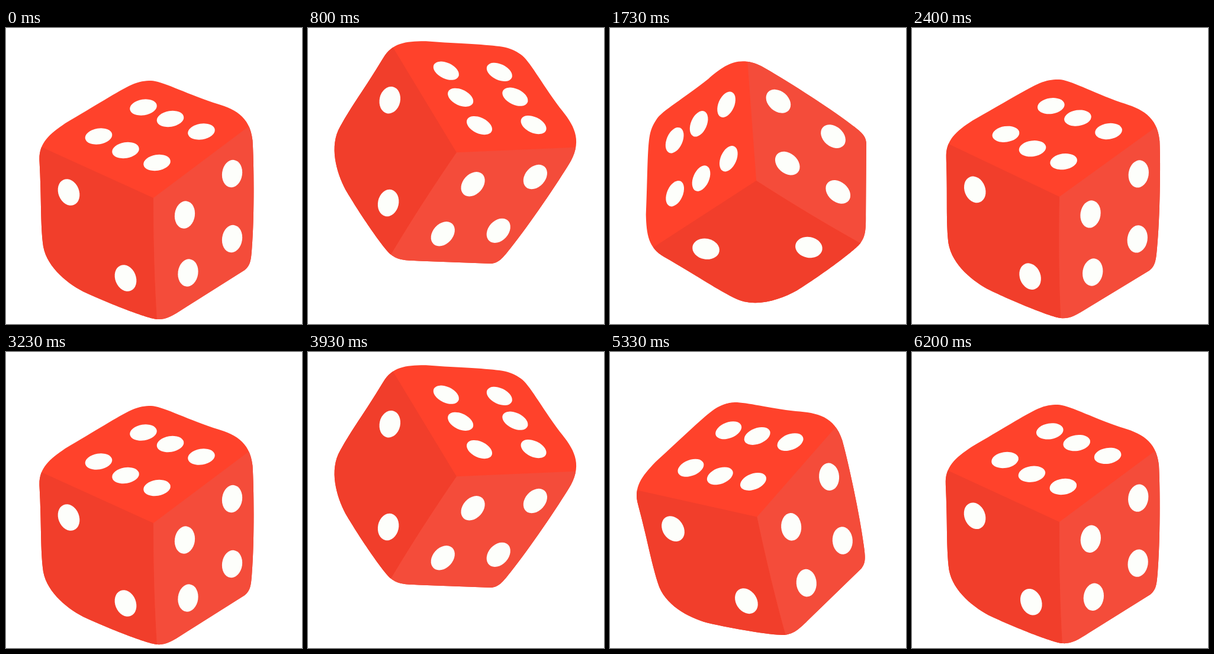
An HTML page that plays this animation: 500x500 px, repeating every 6230 ms.

```html
<!DOCTYPE html>
<html>
<head>
<meta charset="utf-8">
<title>Rolling die</title>
<style>
html, body { margin: 0; width: 100%; height: 100%; overflow: hidden; background: #fff; }
svg { display: block; width: 100%; height: 100%; }
</style>
</head>
<body>
<svg viewBox="0 0 500 500">
  <clipPath id="outline">
    <path d="M245 89C262 89 300 109 350 126C385 136 412 148 416.500 190C419 230 419.500 320 415.500 370C414 392 413 401 403 409L300 474C280 487 270 493 255 492C240 491 175 466 130 445C100 429 65 400 62 362C58 320 60 290 56.500 225C55 195 72 180 100 161C150 132 190 106 212 96C225 90 235 89 245 89Z"/>
  </clipPath>
  <g id="die">
    <g clip-path="url(#outline)">
      <path fill="#ff422b" d="M0 0H500V500H0Z"/>
      <path fill="#f13e2b" d="M249 287L40 192V500H255V492Q249 400 249 287Z"/>
      <path fill="#f44c3a" d="M249 287L425 155V500H255V492Q249 400 249 287Z"/>
    </g>
    <g id="pips" fill="#fdfefb"></g>
  </g>
</svg>
<script>
const LOOP = 6230, ROLL = 3130;
const PIVOT = [250.5, 290];

// Each face: pip radii, tilt, then pip centres
const faces = [
  { rx: 23, ry: 13.4, tilt: -9, at: [[232, 134], [277.5, 153.5], [330, 175], [156.5, 183], [202, 206.5], [255, 227.5]] },
  { rx: 17.5, ry: 23, tilt: -22, at: [[106, 277.5], [202, 422.5]] },
  { rx: 17, ry: 23.3, tilt: 8, at: [[382, 246], [302, 315.5], [382, 356], [307.5, 413.5]] }
];
document.getElementById('pips').innerHTML = faces.map(f => f.at.map(([x, y]) =>
  `<ellipse rx="${f.rx}" ry="${f.ry}" transform="translate(${x} ${y}) rotate(${f.tilt})"/>`
).join('')).join('');

// Time in ms, vertical offset, angle in degrees
const keys = [
  [0, 0, 0], [100, 2, 0], [230, 5, 0], [400, -14, 0.5], [530, -48, 2.5],
  [630, -68, 7.5], [740, -75.5, 21], [800, -76.4, 34.1], [1000, -77, 95],
  [1200, -68, 168], [1370, -53, 224], [1540, -35, 264.7], [1730, -31.8, 302.5],
  [1930, -26, 322], [2000, -21, 330], [2200, -9, 348], [2400, -2, 361],
  [2600, 0, 365], [2850, 0, 362], [3070, 0, 360.3], [ROLL, 0, 360]
];

function slope(i, c) {
  const a = keys[i - 1], b = keys[i + 1];
  return a && b ? (b[c] - a[c]) / (b[0] - a[0]) : 0;
}

// Smooth cubic through the keys
function valueAt(t, c) {
  const i = keys.findIndex(k => k[0] > t) - 1;
  const a = keys[i], b = keys[i + 1], span = b[0] - a[0], u = (t - a[0]) / span;
  const ease = u * u * (3 - 2 * u);
  return a[c] + (b[c] - a[c]) * ease
    + span * u * (1 - u) * (slope(i, c) * (1 - u) - slope(i + 1, c) * u);
}

const die = document.getElementById('die');
const start = performance.now();

function draw() {
  const t = (performance.now() - start) % LOOP % ROLL;
  die.setAttribute('transform', `translate(0 ${valueAt(t, 1)}) rotate(${valueAt(t, 2)} ${PIVOT})`);
  requestAnimationFrame(draw);
}
draw();
</script>
</body>
</html>
```
